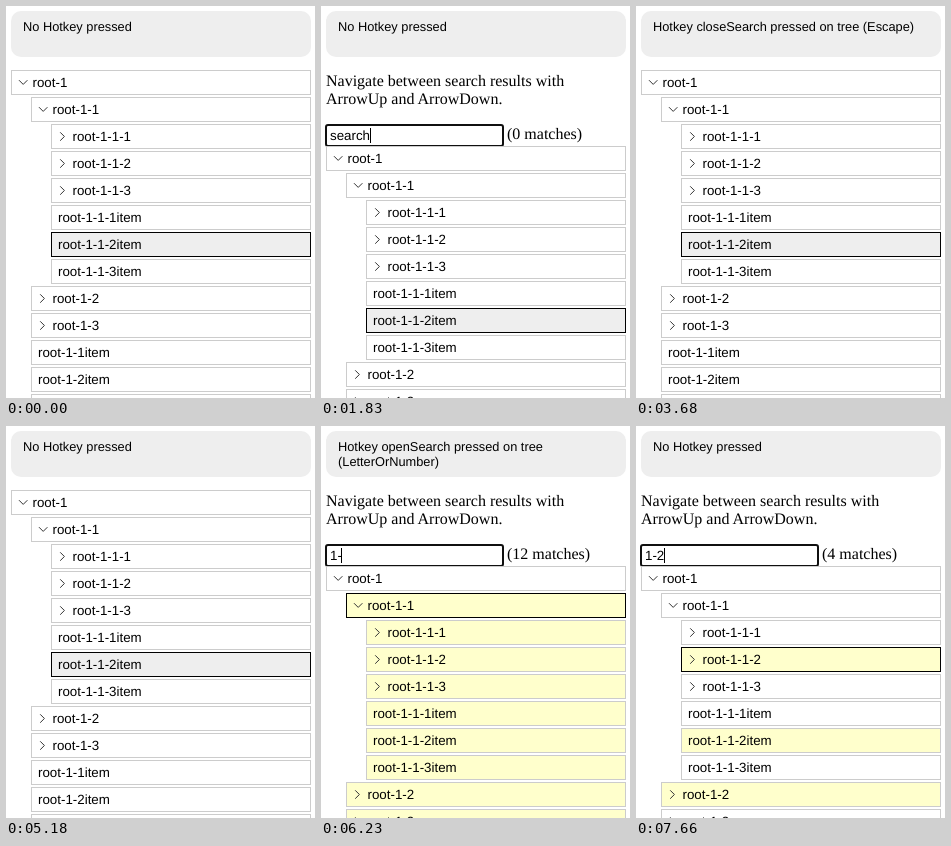
Animation, 309 px wide and 392 px high, one loop 8000 ms. Source, as an HTML page:

```html
<!DOCTYPE html>
<html lang="en">
<head>
<meta charset="utf-8">
<title>Tree search</title>
<style>
  html, body { margin: 0; width: 100%; height: 100%; overflow: hidden; background: #fff; }
  #stage {
    position: relative; width: 309px; height: 392px; overflow: hidden; color: #000;
    font: 13.333px/15px "Liberation Sans", Arial, sans-serif;
    text-rendering: geometricPrecision; white-space: pre;
  }
  #stage div { position: absolute; box-sizing: border-box; }
  #status {
    left: 5px; top: 5px; width: 300px; height: 46px; padding: 8px 12px;
    border-radius: 10px; background: #eee; font-size: 12.8px;
  }
  #search { left: 0; top: 0; }
  #hint, #count { font: 16px/18px "Liberation Serif", "Times New Roman", serif; }
  #hint { left: 5px; top: 67px; }
  #count { left: 186px; top: 120px; }
  #field {
    left: 4px; top: 118px; width: 179px; height: 23px; padding: 2px 3px;
    border: 2px solid #101010; border-radius: 3px; background: #fff;
  }
  #caret {
    display: inline-block; width: 1px; height: 15px; margin-left: -.48px;
    vertical-align: top; background: #000;
  }
  #tree { left: 0; width: 305px; }
  #tree .row { right: 0; height: 25px; padding: 4px 6px; border: 1px solid #ccc; background: #fff; }
  #tree .folder { padding-left: 20.5px; }
  #tree .focus { border-color: #000; background: #eee; }
  #tree .match { background: #ffc; }
  svg { position: absolute; left: -1px; top: -1px; width: 25px; height: 25px; fill: none; stroke: #333; }
</style>
</head>
<body>
<div id="stage">
  <div id="status"></div>
  <div id="search">
    <div id="hint">Navigate between search results with
ArrowUp and ArrowDown.</div>
    <div id="field"><span id="query"></span><span id="caret"></span></div>
    <div id="count"></div>
  </div>
  <div id="tree"></div>
</div>
<script>
const DURATION = 8000;
const ROW_PITCH = 27;
const IDLE = "No Hotkey pressed";
const OPENED = "Hotkey openSearch pressed on tree\n(LetterOrNumber)";
const CLOSED = "Hotkey closeSearch pressed on tree (Escape)";
const SELECTED = "root-1-1-2item";
const CHEVRON = { open: "M8 10.2L12.2 14.4L16.4 10.2", closed: "M9.2 8.3L13.4 12.5L9.2 16.7" };

// Each step changes part of the state; a null query means the search is closed.
const timeline = [
  [0, { status: IDLE, query: null, caret: true }],
  [370, { status: OPENED, query: "s" }],
  [550, { query: "se" }],
  [670, { query: "sea" }],
  [790, { query: "sear" }],
  [970, { query: "searc" }],
  [1400, { query: "search" }],
  [1830, { status: IDLE }],
  [1890, { caret: false }],
  [2450, { caret: true }],
  [2570, { query: "" }],
  [2940, { caret: false }],
  [3500, { caret: true }],
  [3680, { status: CLOSED, query: null }],
  [5180, { status: IDLE }],
  [5920, { status: OPENED, query: "1" }],
  [6230, { query: "1-" }],
  [6600, { query: "1-2" }],
  [7160, { caret: false }],
  [7350, { status: IDLE }],
  [7660, { caret: true }],
];

const el = id => document.getElementById(id);
const children = (parent, suffix = "") => [1, 2, 3].map(n => `${parent}-${n}${suffix}`);
const openFolders = ["root-1", "root-1-1"];

function expand(label) {
  if (!openFolders.includes(label)) return [label];
  return [label, ...children(label).flatMap(expand), ...children(label, "item")];
}

const rows = [...children("root").flatMap(expand), ...children("root", "item")].map((label, i) => {
  const node = document.createElement("div");
  const isFolder = !label.endsWith("item");
  const depth = label.split("-").length - 2;
  node.style.left = 5 + depth * 20 + "px";
  node.style.top = i * ROW_PITCH + "px";
  const shape = CHEVRON[openFolders.includes(label) ? "open" : "closed"];
  node.innerHTML = (isFolder ? `<svg><path d="${shape}"/></svg>` : "") + label;
  el("tree").append(node);
  return { label, node, isFolder };
});

function render({ status, query, caret }) {
  const matches = query ? rows.filter(row => row.label.includes(query)) : [];
  const focused = matches.length ? matches[0].label : SELECTED;
  el("status").textContent = status;
  el("search").style.display = query === null ? "none" : "";
  el("query").textContent = query;
  el("caret").style.visibility = caret ? "visible" : "hidden";
  el("count").textContent = `(${matches.length} matches)`;
  el("tree").style.top = query === null ? "64px" : "140px";
  for (const row of rows) {
    const classes = ["row"];
    if (row.isFolder) classes.push("folder");
    if (row.label === focused) classes.push("focus");
    if (matches.includes(row)) classes.push("match");
    row.node.className = classes.join(" ");
  }
}

const start = performance.now();
let shown = -1;

function tick() {
  const time = (performance.now() - start) % DURATION;
  const passed = timeline.filter(([at]) => at <= time);
  if (passed.length !== shown) {
    shown = passed.length;
    render(Object.assign({}, ...passed.map(([, change]) => change)));
  }
  requestAnimationFrame(tick);
}
tick();
</script>
</body>
</html>
```
